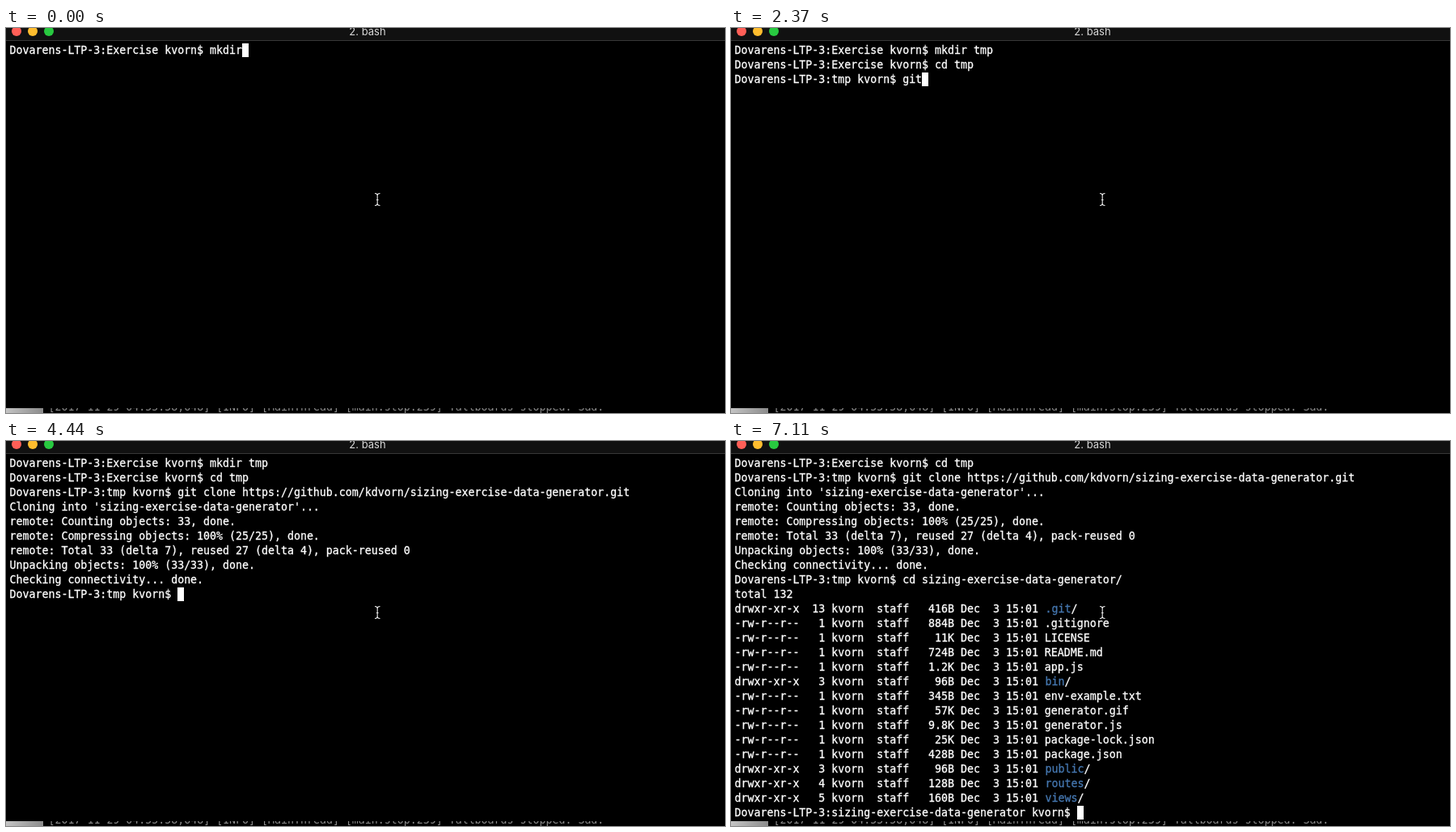
Write an HTML page with a canvas that moves like this. It is 889 px wide and 476 px high and loops after 8 s.

```html
<!DOCTYPE html>
<html lang="en">
<head>
<meta charset="utf-8">
<title>Terminal session</title>
<style>
  html, body { margin: 0; width: 100%; height: 100%; overflow: hidden; background: #000; }
  canvas { display: block; }
</style>
</head>
<body>
<canvas id="stage" width="889" height="476"></canvas>
<script>
const ctx = document.getElementById('stage').getContext('2d');
const LOOP = 8000, COL = 8, ROW = 18, LEFT = 4, TOP = 19, VISIBLE_ROWS = 25;
const MONO = '13.289px "DejaVu Sans Mono", monospace';
const USER = 'kvorn', REPO = 'sizing-exercise-data-generator';
const prompt = dir => `Dovarens-LTP-3:${dir} ${USER}$ `;

const cloneOutput = `remote: Counting objects: 33, done.
remote: Compressing objects: 100% (25/25), done.
remote: Total 33 (delta 7), reused 27 (delta 4), pack-reused 0
Unpacking objects: 100% (33/33), done.
Checking connectivity... done.
`;

const files = [
  [13, '416B', '.git/'], [1, '884B', '.gitignore'], [1, '11K', 'LICENSE'],
  [1, '724B', 'README.md'], [1, '1.2K', 'app.js'], [3, '96B', 'bin/'],
  [1, '345B', 'env-example.txt'], [1, '57K', 'generator.gif'],
  [1, '9.8K', 'generator.js'], [1, '25K', 'package-lock.json'],
  [1, '428B', 'package.json'], [3, '96B', 'public/'],
  [4, '128B', 'routes/'], [5, '160B', 'views/'],
];
const listing = files.map(([links, size, name]) => {
  const mode = name.endsWith('/') ? 'drwxr-xr-x' : '-rw-r--r--';
  return `${mode} ${String(links).padStart(3)} ${USER}  staff  ${size.padStart(5)} Dec  3 15:01 ${name}\n`;
}).join('');

// Text appended to the terminal at each time in ms.
const output = [
  [0, prompt('Exercise') + 'mkdir'],
  [150, ' '], [300, 't'], [450, 'm'], [600, 'p'],
  [1050, '\n' + prompt('Exercise')],
  [1200, 'cd'], [1340, ' '], [1490, 't'], [1640, 'mp'],
  [1780, '\n' + prompt('tmp')],
  [2220, 'gi'], [2370, 't'], [2510, ' '], [2660, 'c'], [2810, 'l'],
  [3110, 'o'], [3260, 'n'], [3400, 'e'], [3550, ' '],
  [3690, `https://github.com/kdvorn/${REPO}.git`],
  [4140, `\nCloning into '${REPO}'...\n`],
  [4440, cloneOutput + prompt('tmp')],
  [5030, 'cd'], [5180, ' '],
  [6070, 's'], [6220, 'i'], [6370, 'z'], [6520, REPO.slice(3) + '/'],
  [7110, '\ntotal 132\n' + listing + prompt(REPO)],
];

function text(str, x, y, color, font = MONO) {
  ctx.font = font;
  ctx.fillStyle = color;
  ctx.fillText(str, x, y);
}

// Terminal glyphs get a hairline outline for a slightly heavier weight.
function terminalText(str, col, y, color) {
  const x = LEFT + 0.5 + col * COL;
  text(str, x, y, color);
  ctx.strokeStyle = color;
  ctx.lineWidth = 0.3;
  ctx.strokeText(str, x, y);
}

function rect(x, y, w, h, color) {
  ctx.fillStyle = color;
  ctx.fillRect(x, y, w, h);
}

function drawTitleBar(t) {
  rect(0, 0, 889, 15, '#111');
  rect(0, 15, 889, 1, '#373737');
  ['#ff5f57', '#ffbd2e', '#28c940'].forEach((color, i) => {
    ctx.fillStyle = color;
    ctx.beginPath();
    ctx.arc(13 + 20 * i, 4, 6, 0, 2 * Math.PI);
    ctx.fill();
  });
  ctx.textAlign = 'center';
  const title = t >= 4740 && t < 5480 ? '2. git-remote-https' : '2. bash';
  text(title, 447, 9, '#d8d8d8', '13px Inter, sans-serif');
  ctx.textAlign = 'left';
}

// Strip of the window behind, below the terminal's lower edge.
function drawBackground() {
  ctx.save();
  ctx.beginPath();
  ctx.rect(0, 470, 889, 6);
  ctx.clip();
  const gray = ctx.createLinearGradient(0, 0, 46, 0);
  gray.addColorStop(0, '#c4c4c4');
  gray.addColorStop(1, '#8c8c8c');
  rect(0, 470, 46, 6, gray);
  text('[2017-11-29 04:55:58,648] [INFO] [MainThread] [main:stop:239] Tallboards stopped. Sad.',
    52.5, 473, '#8a8a8a');
  ctx.restore();
}

function drawTerminal(t) {
  const shown = output.filter(([at]) => at <= t).map(([, str]) => str).join('');
  const lines = shown.split('\n').slice(-VISIBLE_ROWS);
  lines.forEach((line, row) => {
    const y = TOP + row * ROW + 13;
    if (line.startsWith('drwx')) {
      const start = line.lastIndexOf(' ') + 1, end = line.length - 1;
      terminalText(line.slice(0, start), 0, y, '#fff');
      terminalText(line.slice(start, end), start, y, '#4577b0');
      terminalText('/', end, y, '#fff');
    } else {
      terminalText(line, 0, y, '#fff');
    }
  });
  const last = lines.length - 1;
  rect(LEFT + lines[last].length * COL, TOP + last * ROW, COL, 17, '#fff');
}

function drawPointer() {
  const beam = new Path2D(
    'M456 204.5 Q459.2 204.5 459.2 207 V217 Q459.2 219.5 456 219.5' +
    'M462.5 204.5 Q459.2 204.5 459.2 207 M462.5 219.5 Q459.2 219.5 459.2 217 M458 212.5 H460.5');
  ctx.strokeStyle = '#f0f0f0';
  ctx.lineWidth = 1.1;
  ctx.stroke(beam);
}

function frame() {
  const t = performance.now() % LOOP;
  rect(0, 0, 889, 476, '#000');
  drawBackground();
  drawTitleBar(t);
  drawTerminal(t);
  drawPointer();
  requestAnimationFrame(frame);
}
frame();
</script>
</body>
</html>
```
